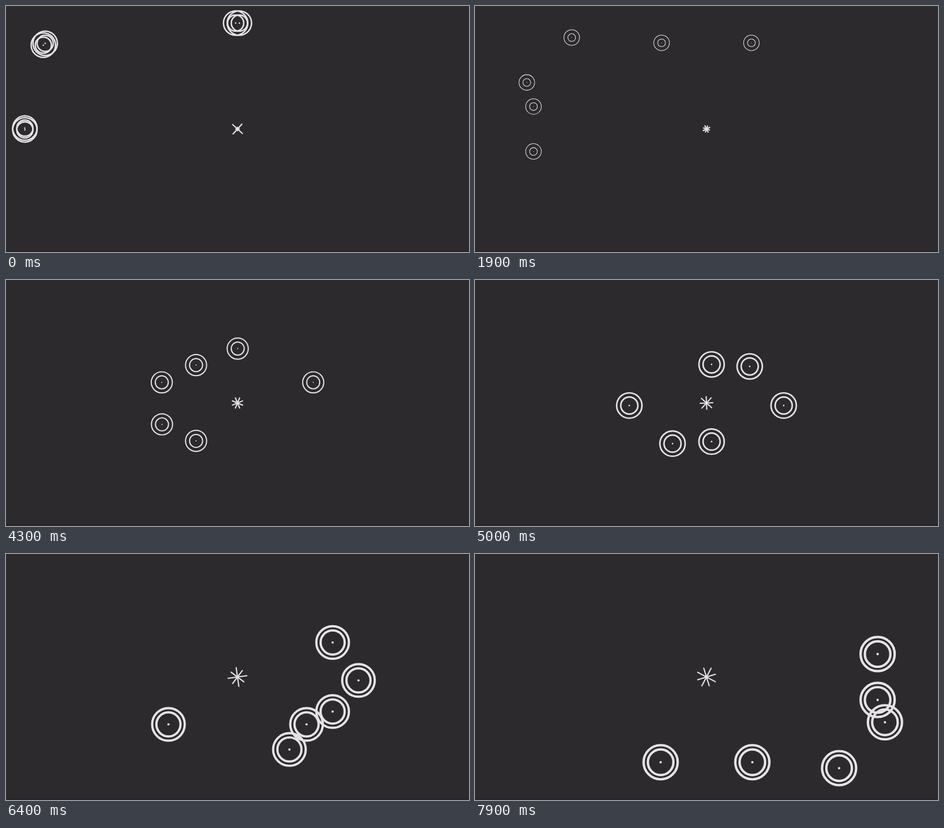
These frames come from a looping animation (800x425 px, 8000 ms). An HTML page with a canvas:

```html
<!DOCTYPE html>
<html lang="en">
<head>
<meta charset="utf-8">
<title>Orbiting rings</title>
<style>
  html, body { margin: 0; width: 100%; height: 100%; overflow: hidden; background: #2c2a2d; }
  canvas { display: block; width: 800px; height: 425px; }
</style>
</head>
<body>
<canvas id="stage" width="800" height="425"></canvas>
<script>
const ctx = document.getElementById("stage").getContext("2d");
const LOOP = 8000, STEP = 100, RAD = Math.PI / 180;
const INK = "#e5e3e6";

// Each pair swings along one axis and splits along another.
const pairs = [
  { swing: [367.5, 0], split: [0, 66.7] },
  { swing: [0, 183], split: [133.4, 0] },
  { swing: [334, 146.5], split: [66.7, -66.7] }
];

// Arm length of the second cross: [ms, px]
const armSteps = [[0, 3], [1900, 5.5], [3500, 7.2], [4300, 9.6], [5700, 12.2], [7000, 15.3], [7900, 16]];

function lerpSteps(steps, t) {
  const i = Math.max(1, steps.findIndex(s => s[0] >= t));
  const [t0, v0] = steps[i - 1], [t1, v1] = steps[i];
  return v0 + (v1 - v0) * (t - t0) / (t1 - t0);
}

function ring(x, y, r) {
  ctx.beginPath();
  ctx.arc(x, y, r, 0, 2 * Math.PI);
  ctx.stroke();
}

function target(x, y, wave) {
  const width = 2.6 - 1.65 * wave;
  const radius = 21.45 - 8.4 * wave;
  ctx.lineWidth = width;
  ring(x, y, radius);
  ring(x, y, radius - 7.1 + 0.3 * wave);
  ctx.beginPath();
  ctx.arc(x, y, width / 2, 0, 2 * Math.PI);
  ctx.fill();
}

function cross(angle, arm) {
  const x = arm * Math.cos(angle), y = -arm * Math.sin(angle);
  ctx.beginPath();
  ctx.moveTo(-x, -y);
  ctx.lineTo(x, y);
  ctx.moveTo(y, -x);
  ctx.lineTo(-y, x);
  ctx.stroke();
}

function draw(t) {
  const a = (1.37 + t * 0.018) * RAD;
  const cos = Math.cos(a), sin = Math.sin(a), wave = Math.sin(2 * a);

  ctx.setTransform(1, 0, 0, 1, 0, 0);
  ctx.fillStyle = "#2c2a2d";
  ctx.fillRect(0, 0, 800, 425);
  ctx.fillStyle = "#282629";
  ctx.fillRect(0, 422, 800, 3);

  ctx.translate(400, 212.5);
  ctx.fillStyle = ctx.strokeStyle = INK;
  for (const { swing, split } of pairs) {
    for (const side of [-1, 1]) {
      target(
        -swing[0] * cos + side * split[0] * sin,
        -swing[1] * cos + side * split[1] * sin,
        wave
      );
    }
  }

  ctx.lineWidth = 2.1;
  ctx.lineCap = "round";
  cross(2 * a + Math.PI / 4, 11.7 - 5.8 * wave);
  cross(2 * a, lerpSteps(armSteps, t));
}

const start = performance.now();
function tick() {
  const t = (performance.now() - start) % LOOP;
  draw(Math.floor(t / STEP) * STEP);
  requestAnimationFrame(tick);
}
tick();
</script>
</body>
</html>
```
